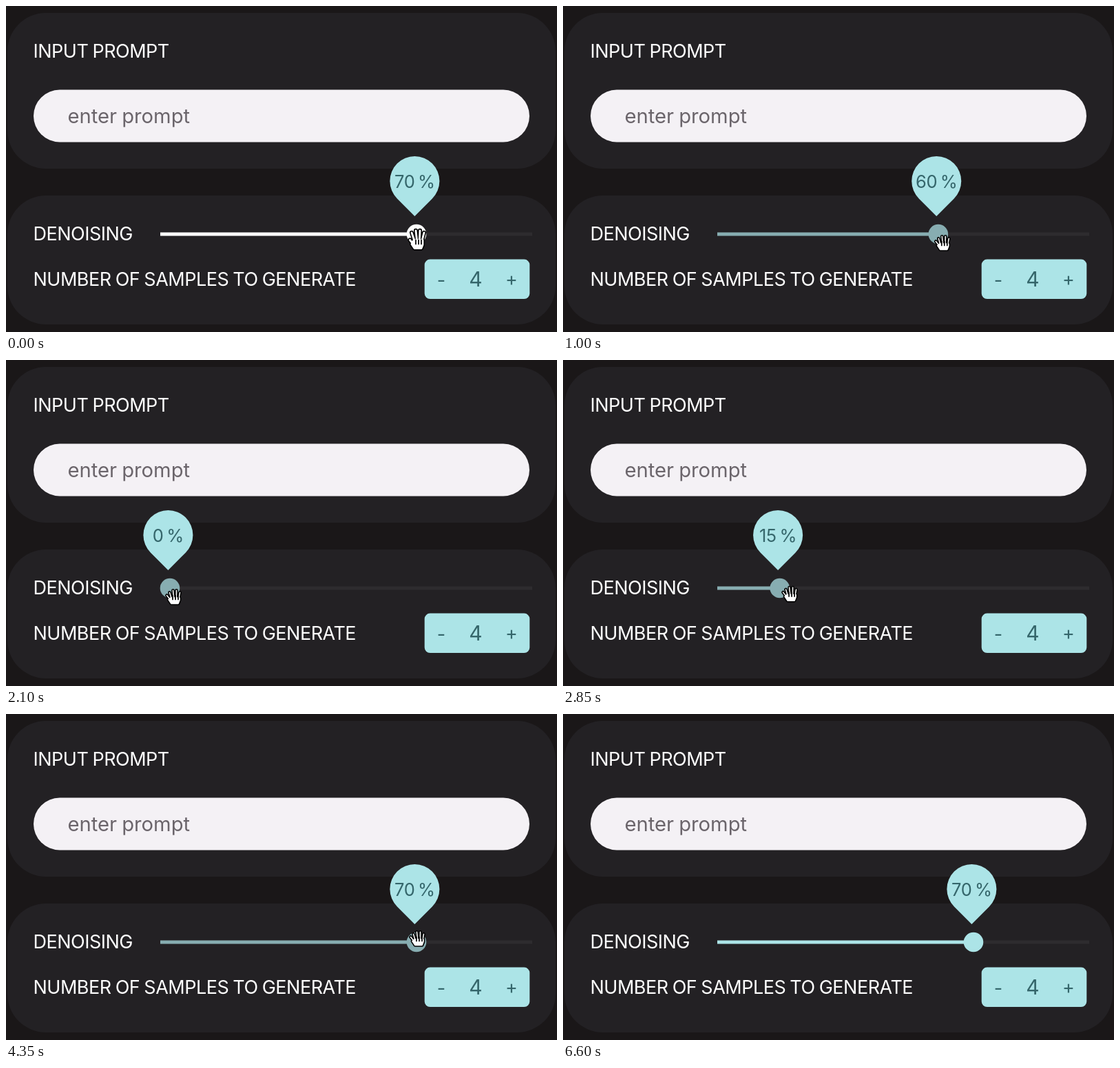
An HTML page for the animation above (6650 ms loop, 800x473 px).

```html
<!DOCTYPE html>
<html lang="en">
<head>
<meta charset="utf-8">
<title>Denoising slider</title>
<style>
  html, body { margin: 0; width: 100%; height: 100%; overflow: hidden; background: #1a1718; }
  svg { display: block; width: 800px; height: 473px; }
  text { font: 27px Inter, sans-serif; letter-spacing: -.5px; word-spacing: -1px; fill: #fff; }
  .panel { fill: #232124; }
  .accent { fill: #ace4e7; }
  .accent-text text { fill: #35666b; text-anchor: middle; letter-spacing: 0; }
  #prompt { font-size: 29.2px; letter-spacing: 0; fill: #6b656b; }
  #label { font-size: 25.5px; letter-spacing: -.4px; word-spacing: -2px; }
  .accent-text .count { font-size: 30px; }
  #cursor path { stroke-linejoin: round; stroke-linecap: round; }
</style>
</head>
<body>
<svg viewBox="0 0 800 473">
  <rect class="panel" x="2" y="10" width="796" height="226" rx="56"/>
  <rect class="panel" x="2" y="275" width="796" height="187" rx="56"/>

  <text x="39.5" y="75">INPUT PROMPT</text>
  <rect x="40" y="121.5" width="720" height="76" rx="38" fill="#f4f1f5"/>
  <text id="prompt" x="89.5" y="170">enter prompt</text>

  <text x="39.5" y="340">DENOISING</text>
  <rect x="224" y="328.5" width="540" height="5" fill="#2e2c2f"/>
  <g id="slider">
    <rect id="fill" x="224" y="328.5" height="5"/>
    <circle id="thumb" cy="331" r="14.3"/>
  </g>

  <text x="39.5" y="406">NUMBER OF SAMPLES TO GENERATE</text>
  <rect class="accent" x="607.7" y="367.6" width="152.6" height="57.4" rx="8"/>
  <g class="accent-text">
    <text x="632" y="407">-</text>
    <text class="count" x="682" y="407">4</text>
    <text x="734" y="406">+</text>
  </g>

  <g id="pin" class="accent-text">
    <path class="accent" d="M0 305L-25.46 279.46A36 36 0 1 1 25.46 279.46Z"/>
    <text id="label" y="264"></text>
  </g>

  <g id="cursor"><g id="open"></g><g id="closed"></g></g>
</svg>
<script>
const LOOP = 6650, GRAB = 550, RELEASE = 4450, LEAVE = 5050, GONE = 5300;
const STEP = 5.114, ZERO = 238;
const $ = id => document.getElementById(id);

// Pointer moves: start, end, dx, dy
const moves = [
  [50, 300, 3, 18], [300, 600, 2, -13],
  [801, 1650, -358, 0], [2350, 3910, 354, -18],
  [4950, 5300, 30, 170]
];

function pointer(t) {
  let x = 597, y = 338;
  for (const [start, end, dx, dy] of moves) {
    const k = Math.min(1, Math.max(0, (t - start) / (end - start)));
    const ease = k * k * (3 - 2 * k);
    x += dx * ease;
    y += dy * ease;
  }
  return [x, y];
}

// A palm, a thumb and four fingers, outlined by a wider stroke beneath
function hand(bottom, spread, reach) {
  const width = bottom * .45;
  let shape = `M-5 2H8V${bottom - 5}L6 ${bottom}H-4L-8 ${bottom - 6}Z`;
  shape += `M-5 ${bottom - 5}L-10.5 ${bottom - 12}`;
  let creases = "";
  for (let i = 0; i < 4; i++) {
    const side = i - 1.5;
    const tip = -reach + 1.5 * side * side;
    shape += `M${1.5 + side * 3.6} 3L${1 + side * spread} ${tip}`;
    if (i) creases += `M${side * 4} ${bottom - 12}v6`;
  }
  return `<path d="${shape}" fill="#000" stroke="#000" stroke-width="${width}"/>
    <path d="${shape}" fill="#fff" stroke="#fff" stroke-width="${width - 3.2}"/>
    <path d="${creases}" fill="none" stroke="#000" stroke-width="1.7"/>`;
}

function show(id, on) {
  $(id).setAttribute("visibility", on ? "visible" : "hidden");
}

function draw(now) {
  const t = now % LOOP;
  const held = t >= GRAB && t < RELEASE;
  const [px, py] = pointer(t);
  const value = held ? Math.max(0, Math.round((px - 6 - ZERO) / STEP / 5) * 5) : 70;
  const x = ZERO + value * STEP;

  $("slider").setAttribute("fill", held ? "#87adb1" : t < LEAVE ? "#fff" : "#ace4e7");
  $("fill").setAttribute("width", x - 224);
  $("thumb").setAttribute("cx", x);
  $("pin").setAttribute("transform", `translate(${x - 2.6} 0)`);
  $("label").textContent = value + " %";

  $("cursor").setAttribute("transform", `translate(${px} ${py})`);
  show("open", !held && t < GONE);
  show("closed", held);
  requestAnimationFrame(draw);
}

$("open").innerHTML = hand(13.5, 6, 12.5);
$("closed").innerHTML = hand(10.5, 5, 9);
draw(performance.now());
</script>
</body>
</html>
```
